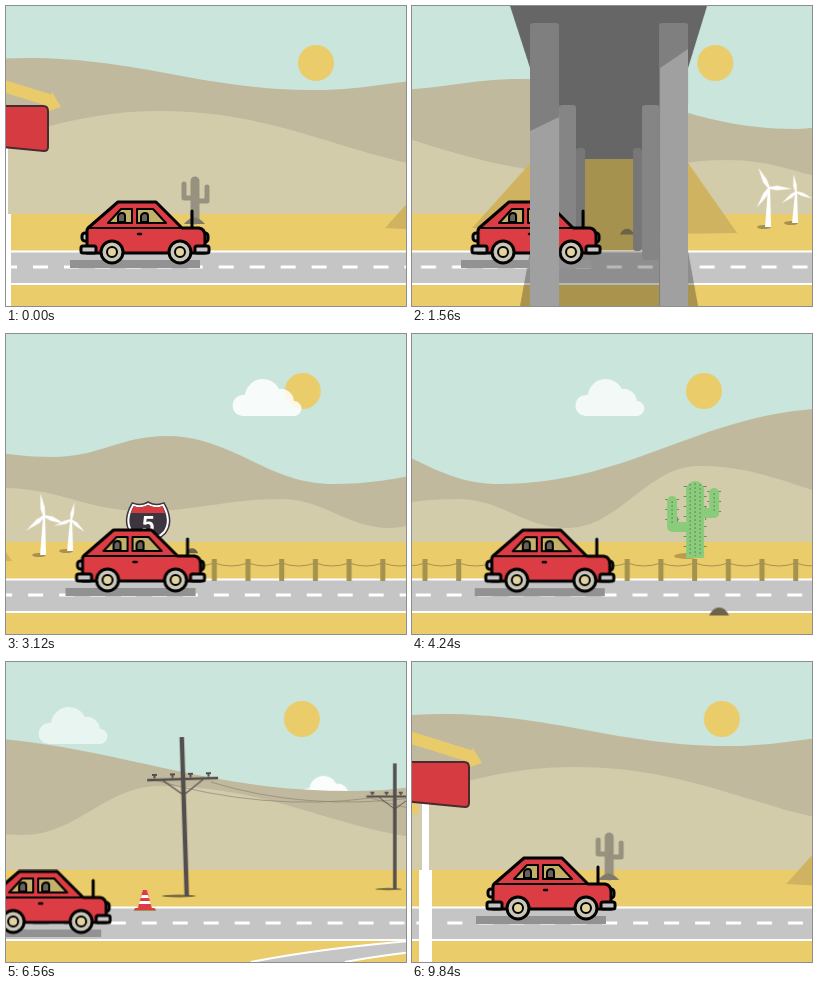
An HTML page for the animation above (9880 ms loop, 400x300 px).

```html
<!DOCTYPE html>
<html lang="en">
<head>
<meta charset="utf-8">
<title>Desert drive</title>
<style>
  html, body { margin: 0; width: 100%; height: 100%; overflow: hidden; background: #c9e5dc; }
  svg { display: block; width: 400px; height: 300px; }
  .scroll { animation: scroll 9.88s steps(247) infinite; }
  @keyframes scroll { to { transform: translateX(calc(var(--d) * -1px)); } }
  .far { --d: 2124; }
  .ground { --d: 2020; }
  .road { --d: 2074.3; }
  .close { --d: 3705; }

  .sun { animation: sun 4.94s linear infinite alternate; }
  @keyframes sun { from { transform: translateX(310px); } to { transform: translateX(289px); } }

  .cloud { animation: cloud 9.88s linear infinite; }
  @keyframes cloud {
    0%, 16% { transform: translate(410px, 44px); opacity: .85; }
    31.58% { transform: translate(226px, 44px); opacity: .85; }
    66.4% { transform: translate(32px, 44px); opacity: .6; }
    80%, 100% { transform: translate(-72px, 44px); opacity: .6; }
  }

  .car { animation: car 9.88s ease-in-out infinite; }
  @keyframes car {
    0%, 41%, 97.3%, 100% { transform: none; }
    16.2% { transform: translate(-15px, 0); }
    65.5% { transform: translate(-99px, 13.5px); }
  }

  .rotor { animation: spin 9.88s linear infinite; }
  @keyframes spin { to { transform: rotate(880deg); } }
</style>
</head>
<body>
<svg viewBox="0 0 400 300">
  <defs>
    <path id="puff" fill="#fff" d="M11 38A10.500 10.500 0 0 1 11 17Q12 16 13 17A18 18 0 0 1 47 11A13 13 0 0 1 62 23A7.500 7.500 0 0 1 62 38Z"/>
    <g id="blades" fill="#fff">
      <path id="blade" d="M-1 0L-2.500-8L0-23L2-8L1 0Z"/>
      <use href="#blade" transform="rotate(120)"/>
      <use href="#blade" transform="rotate(240)"/>
    </g>
    <g id="pole" fill="none" stroke="#544e4d">
      <path stroke-width="4.500" d="M0 0V-159"/>
      <path stroke-width="2.500" d="M-36-117H35"/>
      <path stroke-width="1.200" d="M-20-116L0-101L20-116"/>
      <path stroke-width="2" stroke-dasharray="5 13" d="M-31-122H32"/>
      <path stroke-width="3" stroke-dasharray="2 16" d="M-29.500-120H32"/>
    </g>
    <g id="small-cactus" fill="none" stroke="#97917f" stroke-linecap="round" stroke-linejoin="round">
      <path stroke-width="9" d="M189 175V214"/>
      <path stroke-width="5" d="M178 178V192H189M201 181V195H189"/>
      <path fill="#7f7a6c" stroke="none" d="M178 218Q188 205 199 218Z"/>
    </g>
    <path id="bank" fill="#cfb360" d="M379 222L440 154H593L644 227Q510 230 379 222Z"/>
    <path id="mound" fill="#6d634b" d="M-11 4Q-7-5 0-5T11 4Z"/>
    <path id="badge" d="M765 171Q773 174 780 170Q787 174 795 171Q804 187 796 198Q790 204 780 208Q770 204 764 198Q756 187 765 171Z"/>
    <g id="sign">
      <path fill="#fff" d="M-5 140H2V208H5V300H-8V208H-5Z"/>
      <path fill="none" stroke="#e9cb69" stroke-width="12" d="M-9 146Q-75 148-75 100Q-75 58-15 76L46 95"/>
      <path fill="#e9cb69" d="M46 86L55 101L40 106Z"/>
      <path fill="#d73b42" stroke="#4a2b2d" stroke-width="2" stroke-linejoin="round" d="M-43 100H37Q42 100 42 105V141Q42 145 38 145L-45 137Q-48 136-48 133V105Q-48 100-43 100Z"/>
    </g>
  </defs>

  <rect width="400" height="300" fill="#c9e5dc"/>
  <g class="sun"><circle cy="57" r="18" fill="#eacc6b"/></g>
  <g class="cloud"><use href="#puff"/></g>
  <g class="scroll ground">
    <use href="#puff" transform="translate(1634 113) scale(.8)" opacity=".9"/>
    <use href="#puff" transform="translate(1803 53) scale(.69)" opacity=".6"/>
  </g>
  <g class="scroll far"><path id="far" fill="#c1b99d"/></g>
  <g class="scroll ground"><path id="near" fill="#d3ccab"/></g>
  <rect y="208" width="400" height="92" fill="#eacc6b"/>

  <g class="scroll ground">
    <use href="#small-cactus"/>
    <use href="#small-cactus" x="2020"/>
    <use href="#bank"/>
    <use href="#bank" x="2007"/>
    <rect x="492" y="153" width="49" height="92" fill="#a5924f"/>
    <use href="#mound" transform="translate(534 226) scale(.65)"/>
    <g id="turbines"></g>

    <use href="#mound" transform="translate(824 217) scale(.55)"/>
    <rect x="778" y="205" width="4" height="36" fill="#8c8c8c"/>
    <use href="#badge" stroke="#3d3640" stroke-width="5"/>
    <use href="#badge" fill="#3d3640" stroke="#fff" stroke-width="2"/>
    <path fill="#d73b42" d="M766 172Q773 175 780 171Q787 175 794 172L797 179H763Z"/>
    <text x="780" y="199" fill="#fff" font-family="Roboto, sans-serif" font-size="23" font-weight="700" text-anchor="middle">5</text>

    <ellipse cx="1142" cy="222" rx="13" ry="3" fill="#b79d4e"/>
    <g fill="none">
      <g stroke="#6b8d58" stroke-dasharray="1 9">
        <path stroke-width="23" d="M1150 152V222"/>
        <path stroke-width="14" d="M1127 165V190H1150M1169 157V179H1150"/>
      </g>
      <g stroke="#8acb7c" stroke-linejoin="round">
        <path stroke-linecap="round" stroke-width="10" d="M1127 167V193H1150M1169 159V179H1150"/>
        <path stroke-width="18" d="M1150 224V155"/>
        <path stroke-linecap="round" stroke-width="18" d="M1150 156V158"/>
      </g>
      <path stroke="#5f8f59" stroke-dasharray="2 2" d="M1145 150V222M1150 149V222M1155 150V222M1127 167V190M1169 159V177"/>
    </g>

    <use href="#mound" transform="translate(1938 230)"/>
    <use href="#mound" transform="translate(1988 217) scale(.55)"/>
    <path fill="none" stroke="#8b8675" stroke-width=".7" d="M1486 117Q1600 150 1706 136M1546 120Q1640 149 1748 136M1706 136Q1790 162 1858 153M1748 136Q1810 158 1892 153"/>
    <g id="poles"></g>
  </g>

  <rect y="244.500" width="400" height="34.500" fill="#fff"/>
  <rect y="246.500" width="400" height="30.500" fill="#c5c5c5"/>
  <g class="scroll road">
    <path fill="#c5c5c5" d="M1622 300Q1700 285 1795 277H2010Q1830 279 1716 300Z"/>
    <path fill="none" stroke="#fff" stroke-width="2" d="M1622 300Q1700 285 1795 278M1716 300Q1830 279 2010 278"/>
    <path stroke="#fff" stroke-width="3" stroke-dasharray="15 15.960" d="M-4 261H2500"/>
  </g>
  <g class="scroll ground">
    <g id="fence" fill="none" stroke="#a5924f"></g>
    <g transform="translate(1480 248)">
      <path fill="#a5924f" d="M-11-1H11V1H-11Z"/>
      <path fill="#dc3c43" d="M-2-20H2L7-2H10V0H-10V-2H-7Z"/>
      <path fill="#fff" d="M-3-15H3L4-12H-4ZM-5-9H5L6-6H-6Z"/>
    </g>
    <use href="#mound" transform="translate(1174 278) scale(.9)"/>
    <path fill="#000" opacity=".28" d="M437 245H595L605 300H427Z"/>
    <path fill="#666" d="M417 0H614L595 62H437Z"/>
    <g id="bays"></g>
  </g>

  <g class="car">
    <rect x="64" y="254" width="130" height="8" fill="#929292"/>
    <g stroke="#000" stroke-width="3" stroke-linejoin="round">
      <path fill="none" stroke-linecap="round" d="M186 205V223"/>
      <rect x="76" y="227" width="9" height="8" rx="3" fill="#c5c5c5"/>
      <rect x="194" y="227" width="8" height="9" rx="3" fill="#c5c5c5"/>
      <path fill="#dc3c43" d="M82 222L112 196H150L176 222H193Q199 223 199 230V247H81V224Z"/>
      <path fill="none" stroke-width="2" d="M82 222H178"/>
      <path fill="#c3b06a" stroke-width="2" d="M102 217L115 203H126V217ZM131 217V203H147L160 217Z"/>
      <path fill="#68635a" stroke-width="2" d="M112 216V210Q113 207 116 207T119 210V216ZM135 216V210Q136 207 139 207T142 210V216Z"/>
      <path fill="none" stroke-width="2.500" stroke-linecap="round" d="M132 228H135"/>
      <rect x="75" y="240" width="15" height="7" rx="2" fill="#c5c5c5"/>
      <rect x="189" y="240" width="14" height="7" rx="2" fill="#c5c5c5"/>
      <g id="wheel">
        <circle cx="106" cy="246" r="11" fill="#cbc7b8"/>
        <circle cx="106" cy="246" r="5" fill="#e3d3a0" stroke-width="2"/>
      </g>
      <use href="#wheel" x="68"/>
    </g>
  </g>

  <g class="scroll ground">
    <g id="front"></g>
    <path fill="#a0a0a0" d="M437 125L466 111V300H437ZM567 62L595 43V300H567Z"/>
  </g>
  <g class="scroll close">
    <use href="#sign"/>
    <use href="#sign" x="3705"/>
  </g>
</svg>

<script>
  const el = id => document.getElementById(id);

  // Repeating ridge eased between its crests and troughs.
  function ridge(id, width, turns) {
    const points = [-width, 0, width].flatMap(o => turns.map(([x, y]) => [x + o, y]));
    let d = `M${points[0]}`;
    points.slice(1).forEach(([x, y], i) => {
      const [px, py] = points[i], k = (x - px) * .4;
      d += `C${px + k} ${py} ${x - k} ${y} ${x} ${y}`;
    });
    el(id).setAttribute('d', `${d}V209H${points[0][0]}Z`);
  }
  ridge('far', 2124, [[20, 52], [310, 84], [445, 73], [718, 123], [831, 102], [998, 150], [1340, 74], [1755, 129]]);
  ridge('near', 2020, [[155, 105], [500, 168], [635, 154], [775, 177], [913, 165], [1022, 194], [1154, 132], [1358, 173], [1495, 124], [1810, 180]]);

  const turbine = (x, hub, base, size, turn) => `
    <ellipse cx="${x - 4}" cy="${base}" rx="7" ry="2" fill="#a5924f"/>
    <path fill="#fff" d="M${x - 3} ${base}L${x} ${hub}H${x + 2}L${x + 3} ${base}Z"/>
    <g transform="translate(${x + 1} ${hub}) scale(${size}) rotate(${turn})">
      <g class="rotor"><use href="#blades"/></g>
    </g>`;
  el('turbines').innerHTML = turbine(675, 182, 221, 1, 73) + turbine(702, 186, 217, .78, 93);

  const pole = (x, base, size, lean) => `
    <g transform="translate(${x} ${base}) scale(${size})">
      <ellipse cx="-8" rx="17" ry="1.5" fill="#7d7040"/>
      <use href="#pole" transform="rotate(${lean})"/>
    </g>`;
  el('poles').innerHTML = pole(1522, 234, 1, -1.8) + pole(1730, 227, .79, 0) + pole(1873, 222, .6, 1.2);

  const gap = 33.7;
  let posts = '', wires = '';
  for (let i = 0; i < 16; i++) {
    const x = 812.5 + i * gap;
    posts += `M${x} 225V247`;
    if (i < 15) wires += `M${x} 229q${gap / 2} 6 ${gap} 0`;
  }
  el('fence').innerHTML = `<path d="${wires}"/><path stroke-width="5" d="${posts}"/>`;

  // Bridge bays are nested and symmetric about one centre line.
  const mid = 516;
  const rect = (x, y, w, h, fill, r = 0) =>
    `<rect x="${x}" y="${y}" width="${w}" height="${h}" rx="${r}" fill="${fill}"/>`;
  const deck = (half, bottom) => rect(mid - half, 60, half * 2, bottom - 60, '#666');
  const columns = (half, w, top, bottom, fill) =>
    [mid - half, mid + half - w].map(x => rect(x, top, w, bottom - top, fill, 3)).join('');
  el('bays').innerHTML = deck(79, 99) + deck(50, 142) + deck(33, 153)
    + columns(33, 9, 142, 245, '#777') + columns(50, 17, 99, 254, '#858585');
  el('front').innerHTML = columns(79, 29, 17, 303, '#7f7f7f');
</script>
</body>
</html>
```
